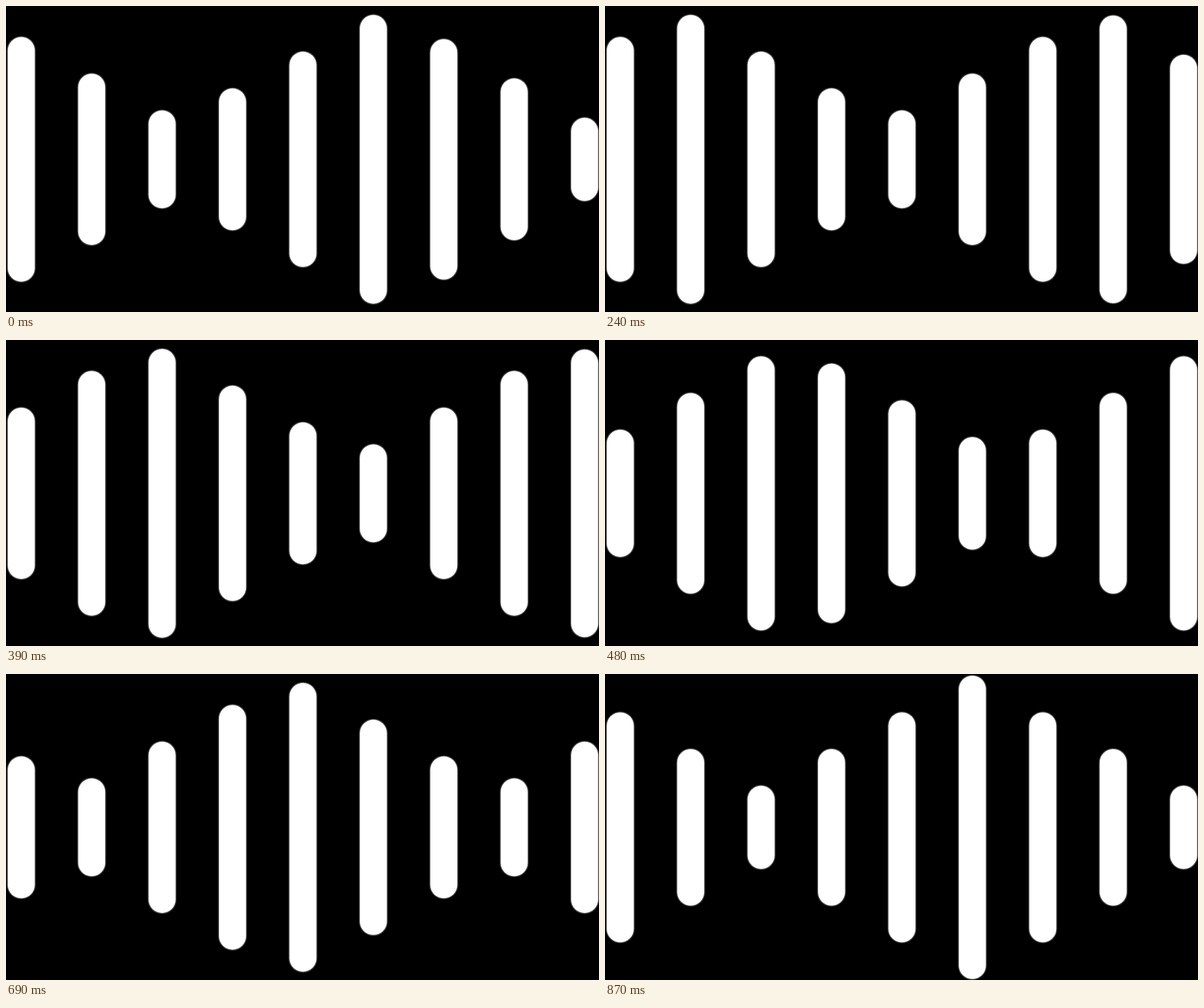
Write an HTML page with a canvas that moves like this. It is 1041x538 px and loops after 900 ms.

```html
<!DOCTYPE html>
<html lang="en">
<head>
<meta charset="utf-8">
<title>Sound bars</title>
<style>
  html, body { margin: 0; width: 100%; height: 100%; overflow: hidden; background: #000; }
  canvas { display: block; }
</style>
</head>
<body>
<canvas id="stage" width="1041" height="538"></canvas>
<script>
const ctx = document.getElementById("stage").getContext("2d");

const STEP_MS = 30;
const STEPS = 30;
const HALF = STEPS / 2;
const BARS = 9;
const FIRST_X = 26.8;
const PITCH = 123.62;
const MID_Y = 269.6;
const MAX_REACH = 268.4;
const MIN_REACH = 74.8;
const RADIUS = 25.4;
const EDGE = 1.7;

// Steps away from the bar's tallest pose, 0 to HALF.
function distance(bar, step) {
  const peak = 4 + 5 * (bar % 6);
  const gap = Math.abs(step - peak);
  // The last three bars start late and catch up on their first rise.
  if (bar > 5 && step < peak) return gap * HALF / (HALF - 1);
  return Math.min(gap, STEPS - gap);
}

function pill(x, reach, radius, color) {
  ctx.fillStyle = color;
  ctx.beginPath();
  ctx.arc(x, MID_Y - reach + radius, radius, Math.PI, 0);
  ctx.arc(x, MID_Y + reach - radius, radius, 0, Math.PI);
  ctx.fill();
}

function draw(step) {
  ctx.fillStyle = "#000";
  ctx.fillRect(0, 0, 1041, 538);
  for (let bar = 0; bar < BARS; bar++) {
    const x = FIRST_X + bar * PITCH;
    const shrink = distance(bar, step) / HALF;
    const reach = MAX_REACH - (MAX_REACH - MIN_REACH) * shrink;
    pill(x, reach, RADIUS, "#444");
    pill(x, reach - EDGE, RADIUS - EDGE, "#fff");
  }
}

const start = performance.now();

function tick(now) {
  const elapsed = Math.max(0, now - start);
  draw(Math.floor(elapsed / STEP_MS) % STEPS);
  requestAnimationFrame(tick);
}

draw(0);
requestAnimationFrame(tick);
</script>
</body>
</html>
```
